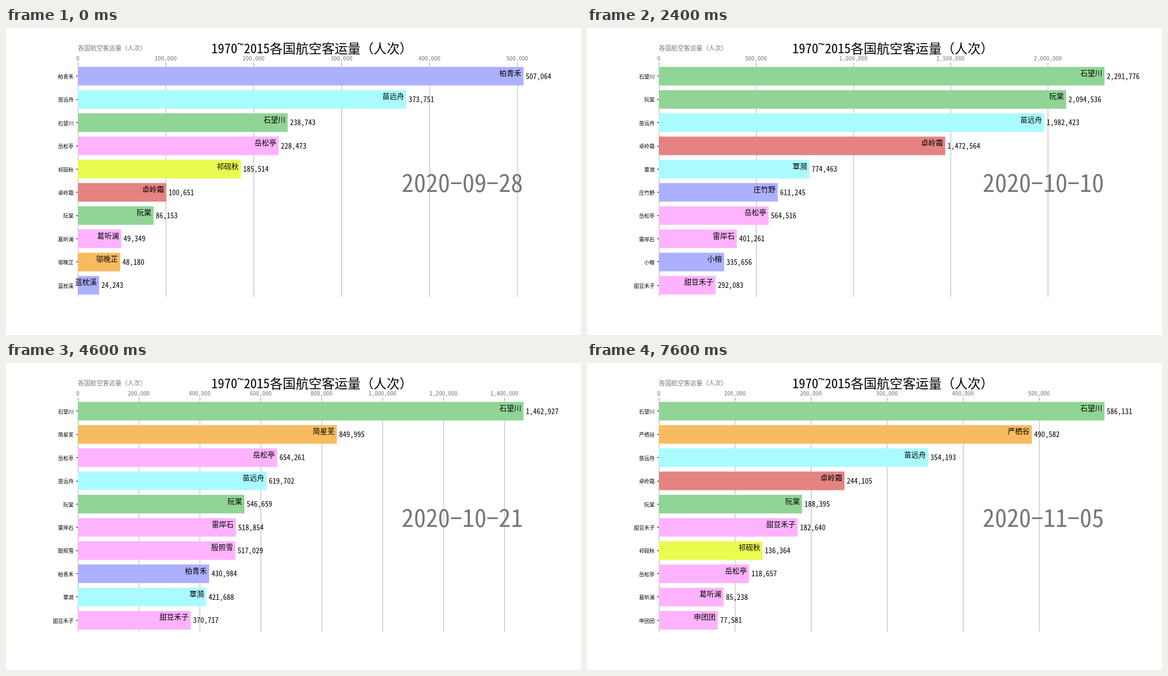
Animation, 1025 px wide and 547 px high, one loop 7800 ms. Source, as an HTML page:

```html
<!DOCTYPE html>
<html lang="zh-CN">
<head>
<meta charset="utf-8">
<title>Bar chart race</title>
<style>
  html, body { margin: 0; width: 100%; height: 100%; overflow: hidden; background: #fff; }
  svg { display: block; width: 100%; height: 100%; }
  text { font-family: "Noto Sans Mono CJK SC", "Noto Sans CJK SC", "Noto Sans CJK", monospace; white-space: pre; }
  .dash { font-family: "DejaVu Sans Mono", monospace; font-size: 36px; }
</style>
</head>
<body>
<svg id="chart" viewBox="0 0 1025 547"></svg>
<script>
const STEP_MS = 200, DAYS = 39, ROWS = 10;
const AXES = { left: 128.1, right: 922.5, top: 65.3, bottom: 479 };
const FIRST_BAR = 69.3, PITCH = 41.39, BAR_HEIGHT = 33.1;
const GREY = '#777777';

const PALETTE = {
  '#adb0ff': '柏青禾 蓝枕溪 虞笙 庄竹野 小榕',
  '#aafbff': '苗远舟 覃漪 池亩 鲁听泉',
  '#90d595': '石望川 阮棠 纪荻',
  '#ffb3ff': '岳松亭 葛听澜 雷岸石 殷照雪 申团团 甜豆禾子 佟梨枝',
  '#eafb50': '祁砚秋 季拂柳 舒蘅',
  '#e48381': '卓岭霜',
  '#f7bb5f': '邬晚芷 简星芜 汤砺岩 严栖谷'
};

// Day number, then the ranking on that day
const SNAPSHOTS = [
  [0, '柏青禾 507064 苗远舟 373751 石望川 238743 岳松亭 228473 祁砚秋 185514 卓岭霜 100651 阮棠 86153 葛听澜 49349 邬晚芷 48180 蓝枕溪 24243'],
  [6, '季拂柳 1331254 石望川 1093234 雷岸石 749796 殷照雪 348799 纪荻 279543 阮棠 197556 葛听澜 179744 申团团 159972 虞笙 80777 舒蘅 71518'],
  [12, '石望川 2291776 阮棠 2094536 苗远舟 1982423 卓岭霜 1472564 覃漪 774463 庄竹野 611245 岳松亭 564516 雷岸石 401261 小榕 335656 甜豆禾子 292083'],
  [19, '石望川 4512966 阮棠 1310548 简星芜 1070378 苗远舟 832512 柏青禾 814596 雷岸石 543633 卓岭霜 401881 岳松亭 367252 汤砺岩 338126 殷照雪 305997'],
  [27, '岳松亭 1165569 覃漪 968534 殷照雪 873600 甜豆禾子 748544 佟梨枝 723903 简星芜 674987 雷岸石 495204 石望川 474224 苗远舟 461292 庄竹野 380039'],
  [33, '石望川 2075029 苗远舟 892987 岳松亭 688319 阮棠 634250 虞笙 379152 葛听澜 361016 柏青禾 314445 雷岸石 208076 池亩 194960 鲁听泉 178794'],
  [38, '石望川 586131 严栖谷 490582 苗远舟 354193 卓岭霜 244105 阮棠 188395 甜豆禾子 182640 祁砚秋 136364 岳松亭 118657 葛听澜 85238 申团团 77581']
].map(([day, ranking]) => {
  const values = {};
  const parts = ranking.split(' ');
  for (let i = 0; i < parts.length; i += 2) values[parts[i]] = +parts[i + 1];
  return { day, values, floor: 0.6 * Math.min(...Object.values(values)) };
});

const colorOf = {};
for (const [color, names] of Object.entries(PALETTE))
  for (const name of names.split(' ')) colorOf[name] = color;

// Values grow geometrically between snapshots; unranked people sit below the last row
function rankingOn(day) {
  const next = Math.max(1, SNAPSHOTS.findIndex(s => s.day >= day));
  const a = SNAPSHOTS[next - 1], b = SNAPSHOTS[next];
  const p = (day - a.day) / (b.day - a.day);
  return Object.keys(colorOf)
    .map(name => {
      const from = a.values[name] || a.floor, to = b.values[name] || b.floor;
      return { name, value: Math.round(from ** (1 - p) * to ** p) };
    })
    .sort((x, y) => y.value - x.value)
    .slice(0, ROWS);
}

// Smallest round step that gives at most nine intervals
function tickStep(max) {
  const unit = 10 ** (Math.floor(Math.log10(max)) - 1);
  return [1, 2, 2.5, 5, 10, 20].map(k => k * unit).find(step => max / step <= 9);
}

const commas = n => n.toLocaleString('en-US');

const text = (x, y, size, str, anchor = 'start', fill = '#000') =>
  `<text x="${x}" y="${y}" font-size="${size}" text-anchor="${anchor}" fill="${fill}">${str}</text>`;

const raised = (str, dy, cls = '') =>
  `<tspan class="${cls}" dy="${-dy}">${str}</tspan><tspan dy="${dy}">\u200b</tspan>`;

const line = (x1, y1, x2, y2, stroke) =>
  `<line x1="${x1}" y1="${y1}" x2="${x2}" y2="${y2}" stroke="${stroke}"/>`;

function axis(max, toX) {
  let out = '';
  const step = tickStep(max);
  for (let v = 0; v <= max; v += step) {
    const x = toX(v), lineX = x + 0.4;
    out += line(lineX, AXES.top, lineX, AXES.bottom, '#b0b0b0')
      + line(lineX, AXES.top - 3, lineX, AXES.top, GREY)
      + text(x, 58, 11.1, commas(v), 'middle', GREY);
  }
  return out;
}

function row({ name, value }, i, toX) {
  const top = FIRST_BAR + i * PITCH, mid = top + BAR_HEIGHT / 2, end = toX(value);
  const tickY = Math.floor(mid) + 0.5;
  return `<rect x="${AXES.left}" y="${top}" width="${end - AXES.left}" height="${BAR_HEIGHT}" fill="${colorOf[name]}"/>`
    + line(125, tickY, 128, tickY, '#000')
    + text(120.6, mid + 4.2, 9.26, name, 'end')
    + text(end - 4, mid - 0.9, 13, name, 'end')
    + text(end + 4, mid + 4.8, 13, commas(value));
}

function draw(day) {
  const ranking = rankingOn(day), max = ranking[0].value;
  const toX = v => AXES.left + (AXES.right - AXES.left) * v / max;
  const date = new Date(Date.UTC(2020, 8, 28 + day)).toISOString().slice(0, 10);
  document.getElementById('chart').innerHTML =
    axis(max, toX)
    + ranking.map((r, i) => row(r, i, toX)).join('')
    + text(AXES.left, 40, 11.1, '各国航空客运量（人次）', 'start', GREY)
    + text(366, 45, 23.15, `1970${raised('~', 8)}2015各国航空客运量（人次）`)
    + text(921.5, 292, 43.2, date.replace(/-/g, raised('−', 4, 'dash')), 'end', GREY);
}

const start = performance.now();
let shown = -1;
function tick(now) {
  const day = Math.floor(Math.max(0, now - start) / STEP_MS) % DAYS;
  if (day !== shown) draw(shown = day);
  requestAnimationFrame(tick);
}
tick(start);
</script>
</body>
</html>
```
